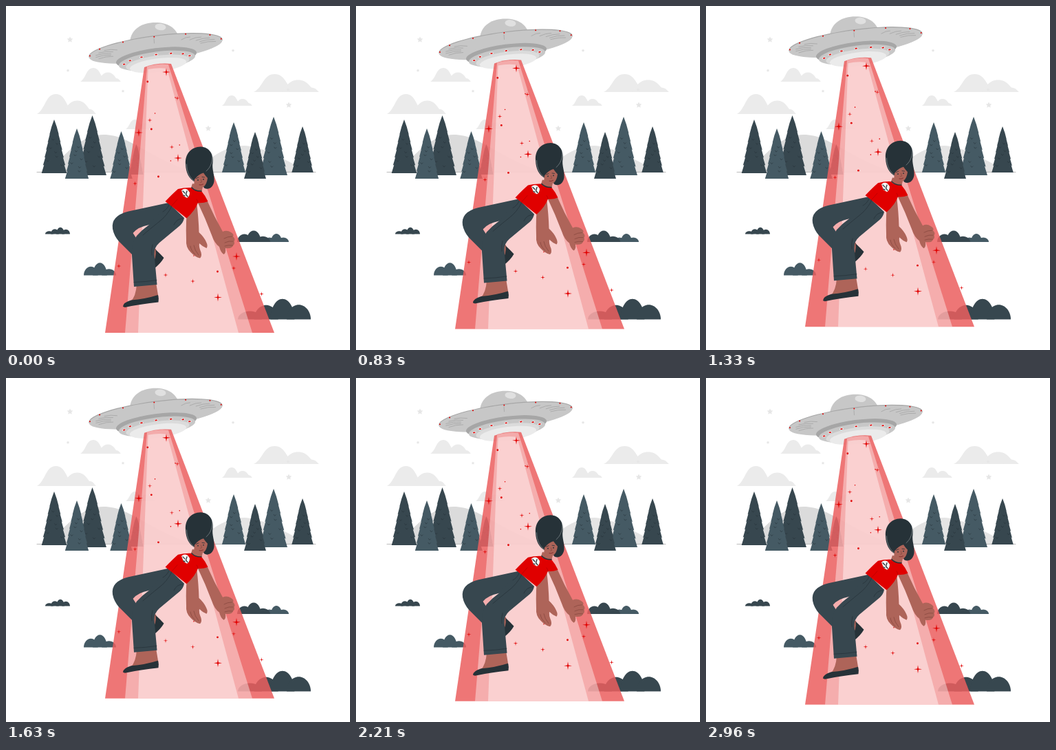
An HTML page with a canvas that plays this animation: 500 by 500 pixels, repeating every 3 s.

```html
<!DOCTYPE html>
<html lang="en">
<head>
<meta charset="utf-8">
<title>Abduction</title>
<style>
html, body { margin: 0; width: 100%; height: 100%; overflow: hidden; background: #fff; }
canvas { display: block; width: 500px; height: 500px; }
</style>
</head>
<body>
<canvas id="stage"></canvas>
<script>
const LOOP = 3000, RISE = 10, TILT = -0.129;
const DARK = '#37474f', SLATE = '#455a64', INK = '#263238', RED = '#e00000';
const SKIN = '#ae6459', CREASE = '#7d4038', PALE = '#ebebeb';
const canvas = document.getElementById('stage');
const ctx = canvas.getContext('2d');
const dpr = window.devicePixelRatio || 1;
canvas.width = canvas.height = 500 * dpr;

let seed = 7;
function rand(min, max) {
  seed = (seed * 16807) % 2147483647;
  return min + (max - min) * seed / 2147483647;
}
const scatter = (n, make) => Array.from({ length: n }, (_, i) => make(i));

// Specks drift evenly down the beam; sky specks spread across the sky
const specks = scatter(14, i => {
  const y = 110 + i * 23, half = 12 + (y - 85) * 0.24;
  return { x: 221 + (y - 85) * 0.11 + rand(-half, half), y, r: i % 3 ? 0.8 : 1.4 };
});
const skySpecks = scatter(5, i => ({ x: 90 + i * 80, y: rand(60, 150) }));

function fill(d, color) {
  ctx.fillStyle = color;
  ctx.fill(new Path2D(d));
}

function line(d, color, width = 0.7) {
  ctx.strokeStyle = color;
  ctx.lineWidth = width;
  ctx.lineCap = ctx.lineJoin = 'round';
  ctx.stroke(new Path2D(d));
}

function oval(x, y, rx, ry, color, angle = 0) {
  ctx.fillStyle = color;
  ctx.beginPath();
  ctx.ellipse(x, y, rx, ry, angle, 0, Math.PI * 2);
  ctx.fill();
}

const dot = (x, y, r, color) => oval(x, y, r, r, color);

// Point on a tilted ellipse
function onRing(x, y, rx, ry, a) {
  const u = rx * Math.cos(a), v = ry * Math.sin(a);
  return [x + u * Math.cos(TILT) - v * Math.sin(TILT), y + u * Math.sin(TILT) + v * Math.cos(TILT)];
}

// Flat-based bump; a larger foot spreads the base
function bump(x, base, rx, h, foot, color) {
  const top = base - h, side = base - h * (0.55 - foot * 0.3), in1 = rx * (1 - foot * 0.45);
  ctx.fillStyle = color;
  ctx.beginPath();
  ctx.moveTo(x - rx, base);
  ctx.bezierCurveTo(x - in1, side, x - rx * 0.55, top, x, top);
  ctx.bezierCurveTo(x + rx * 0.55, top, x + in1, side, x + rx, base);
  ctx.fill();
}

function bush(left, right, base, h, n, peak, color) {
  const w = right - left, rx = w / n * 0.66;
  for (let i = 0; i < n; i++) {
    const u = n > 1 ? i / (n - 1) : peak;
    bump(left + rx + u * (w - 2 * rx), base, rx, h * Math.max(0.4, 1 - 0.9 * Math.abs(u - peak)), 0, color);
  }
}

function cloud(left, right, base, h) {
  const w = right - left;
  bump(left + w * 0.32, base, w * 0.32, h, 1, PALE);
  bump(left + w * 0.68, base, w * 0.26, h * 0.67, 0.6, PALE);
  bump(left + w * 0.88, base, w * 0.12, h * 0.25, 0.6, PALE);
}

function star(x, y, r, points, inner, color) {
  ctx.fillStyle = color;
  ctx.beginPath();
  for (let i = 0; i < points * 2; i++) {
    const a = i * Math.PI / points - Math.PI / 2;
    const q = i % 2 ? r * inner : r;
    ctx.lineTo(x + q * Math.cos(a), y + q * Math.sin(a));
  }
  ctx.fill();
}

function tree(x, top, base, color) {
  const tiers = 7, h = base - top, half = h * 0.235;
  const edge = i => half * Math.pow(i / tiers, 0.78);
  ctx.fillStyle = color;
  ctx.beginPath();
  ctx.moveTo(x, top);
  for (const s of [1, -1]) {
    for (let k = 1; k <= tiers; k++) {
      const i = s > 0 ? k : tiers + 1 - k;
      const outer = [x + s * edge(i), top + h * i / tiers];
      const notch = [x + s * edge(i) * 0.9, outer[1] - 1.2];
      const pair = i === tiers ? [outer] : s > 0 ? [outer, notch] : [notch, outer];
      pair.forEach(p => ctx.lineTo(...p));
    }
  }
  ctx.fill();
  for (let i = 2; i < 9; i++) {
    const y = top + h * (0.2 + i * 0.08);
    line(`M${x + Math.sin(i * 2.4 + x) * half * i * 0.08 - 1.5} ${y} l1.5 2 l1.6 -1.6`, INK, 0.6);
  }
}

function scenery() {
  cloud(108, 167, 110, 20);
  cloud(45, 131, 157, 29);
  cloud(360, 455, 125, 26);
  cloud(314, 358, 145, 15);
  cloud(174, 216, 179, 14);
  for (const [x, y] of [[93, 49], [294, 178], [411, 144]]) star(x, y, 4.5, 5, 0.5, '#e6e6e6');
  for (const p of skySpecks) star(p.x, p.y, 2.5, 5, 0.5, '#e6e6e6');

  fill('M62 242 C95 202 118 187 142 187 C180 187 208 222 275 242Z', '#dbdbdb');
  fill('M275 242 C305 209 335 200 355 204 C395 211 420 236 448 242Z', '#e4e4e4');
  line('M45 241.5 H450', '#b5b5b5', 0.9);

  tree(189.5, 201, 245, SLATE);
  tree(70, 165, 243, DARK);
  tree(125.5, 159, 246, DARK);
  tree(103, 178, 251, SLATE);
  tree(167.5, 182, 251, SLATE);
  tree(331, 169, 242, SLATE);
  tree(389, 161, 246, SLATE);
  tree(362, 183, 251, DARK);
  tree(431, 175, 242, DARK);

  bush(57, 93, 331.5, 10, 4, 0.65, DARK);
  bush(113, 160, 391.5, 20, 3, 0.4, SLATE);
  bush(375, 411, 343, 12, 3, 0.5, SLATE);
  bush(336, 384, 343, 18, 3, 0.4, DARK);
  bush(337, 443, 455.5, 30, 4, 0.68, DARK);
}

function saucer() {
  fill('M180 52 C182 33 198 24 217 24 C235 24 248 32 251 46 Q220 62 180 52Z', '#c7c7c7');
  oval(224.5, 30.5, 8, 4.8, '#e0e0e0', 0.1);
  oval(217.5, 61, 98, 18.2, '#a6a6a6', TILT);
  oval(217.5, 62, 97.6, 18, '#c7c7c7', TILT);
  for (let i = 0; i < 10; i++) {
    const a = Math.PI * (i < 5 ? 0.9 + i * 0.07 : 1.7 + (i - 5) * 0.08);
    const [x, y] = onRing(217.5, 62, 88, 13, a), [x2, y2] = onRing(217.5, 62, 66, 10, a);
    line(`M${x} ${y} Q${(x + x2) / 2} ${(y + y2) / 2 - 2} ${x2} ${y2}`, '#a0a0a0');
  }
  line('M215 47 L215.5 54', '#a0a0a0');

  oval(218.5, 75, 59, 13.8, '#a6a6a6', TILT);
  oval(219.5, 79.5, 56, 13, '#c7c7c7', TILT);
  oval(220.5, 83, 46.5, 11, '#dbdbdb', TILT);
  oval(221, 86, 41.5, 9.8, PALE, TILT);
  for (let i = 0; i < 7; i++) {
    const a = Math.PI * (1.5 + (i - 3) * 0.145);
    const [x, y] = onRing(219.5, 80.5, 49, 10, a);
    oval(x, y, 3, 1.5, '#eeeeee', TILT);
    oval(x, y, 1.9, 0.9, RED, TILT);
    dot(...onRing(217.5, 61.5, 96.5, 17, Math.PI * (1.5 + (i - 3) * 0.158)), 1, RED);
  }
}

function beam() {
  fill('M201 89 Q220 82 240 84 L390 475 H144Z', 'rgba(235,94,94,.85)');
  fill('M205 88 Q221 83 236 85 L358 475 H173Z', 'rgba(255,255,255,.4)');
  fill('M206.5 92 Q221 89 234 91 L338 475 H192Z', 'rgba(255,255,255,.42)');
  for (const [x, y] of [[233, 96], [193, 184], [250, 221], [335, 364], [308, 423.5]]) star(x, y, 6, 4, 0.2, RED);
  for (const [x, y] of [[249, 134], [209, 166], [241, 205], [187.5, 258], [331, 381], [232, 391],
    [271.5, 400], [371.5, 418.5], [164, 378]]) star(x, y, 3.4, 4, 0.2, RED);
  for (const p of specks) dot(p.x, p.y, p.r, RED);
}

function legs() {
  fill('M210 352 L218 353 L220 372 L212 374Z', SKIN);
  fill('M217.5 354 Q224 360 229.5 366 Q225 374 215 382 L212 376 Q219 366 217.5 354Z', INK);
  fill('M236 286 L178 298.5 Q152 305 155 324 Q157 334 164 342 L188 366 L189 337 L184.5 330 Q192 321 208 318 L245 305Z', DARK);
  fill('M190 404 L218 402 L221.5 423 L181 430 Q189 422 190 404Z', SKIN);
  fill('M170 437 Q170 431 182 427.5 Q202 426 221 420 Q222.5 425 221.5 430.5 Q196 433 173 438Z', INK);
  fill('M236 286 L259 308 Q258 314 253 319 L223 344 Q215 351 215.5 361 L219.5 405 L186 408 L183 362 Q182 344 190 334 Q198 325 208 318Z', DARK);
  line('M186 401.5 Q203 401 219 398.5', INK);
  line('M241 291 Q234 305 222 314 Q207 326 199 333', INK);
  line('M237 289 Q234 296 228 299 M257 309 Q248 309 244 318', INK);
  line('M213 347 Q211 353 212 362', INK);
}

function arms() {
  fill('M264 288 L277 285 Q280 309 280.5 329 Q288 336 291 343 Q294 349 291.5 352 Q286 350 281 345 Q280 350 283.5 358 Q285 364 282 366.5 Q275 365 268.5 358 Q261 351 262 340 Q261 312 264 288Z', SKIN);
  line('M273 348 Q274 355 280 362 M268 349 Q269 356 275 361', CREASE, 0.6);
  fill('M278 284 L292 282 Q302 305 315 328 Q321 325 327 329 Q332 332 330 335 Q334 339 331.5 342 Q333 346 330 348 Q329 353 319 352 Q320 359 316.5 361 Q312 358 310 350 Q303 345 299 333 Q290 309 278 284Z', SKIN);
  line('M328.5 335 Q322 335 317 338 M330 342 Q324 341 318 344 M329.5 348 Q323 347 318 349', CREASE, 0.6);
}

function torso() {
  fill('M271 258 L286 263 L284 271 Q275 273 268 267Z', SKIN);
  fill('M231.5 284 Q243 272 250 266 Q260 263.5 269 264 Q274 270 284 269 Q290 276 293.5 284 Q286 287 279 286 Q275 297 262.5 308.5 L238 289Z', RED);
  line('M270 264 Q275 269.5 284 269', INK, 1.4);
  line('M277 281 Q279 283 279 286 M249 281 Q244 287 240 291', '#a90000', 0.6);
  fill('M255 268 Q259 264 264 267 L267 271 Q267 277 263 279 L258 276Z', '#f5f5f5');
  line('M257 269 L260 272 M263 269 L261.5 274 L264 277 M258 275 L260 276', INK, 1.3);
}

function head() {
  fill('M261 230 C260 215 269 205 283 204.5 C296 205 302 216 300.5 228 C299 238 303.5 245 302.5 255 C301 264 294 268 288 264.5 Q284 255 275 256 C266 251 261.5 243 261 230Z', INK);
  fill('M274 252 Q280 244 287 242.5 Q290 247 293 250 Q292 259 287 263 Q279 266 273 261Z', SKIN);
  line('M262.5 230 C263 242 267 249 273 254 M299.5 216 C301 226 297 235 291 240', '#a9b0b3', 0.5);
  dot(279, 253, 0.9, INK);
  dot(287, 252, 0.9, INK);
  line('M276.5 250.5 L280 249 M285 248.5 L288.5 249', INK, 0.8);
  line('M283.5 252 L284.5 256 L282.5 256.5', CREASE, 0.6);
  line('M281 260 Q284 260.8 286.5 259', '#7a2325', 0.8);
}

function draw(now) {
  const t = (now % LOOP) / LOOP;
  const lift = RISE * (1 - Math.abs(2 * t - 1));
  ctx.setTransform(dpr, 0, 0, dpr, 0, 0);
  ctx.fillStyle = '#fff';
  ctx.fillRect(0, 0, 500, 500);
  scenery();
  ctx.translate(0, -lift);
  saucer();
  beam();
  arms();
  legs();
  torso();
  head();
}

const start = performance.now();
function tick() {
  draw(performance.now() - start);
  requestAnimationFrame(tick);
}
tick();
</script>
</body>
</html>
```
